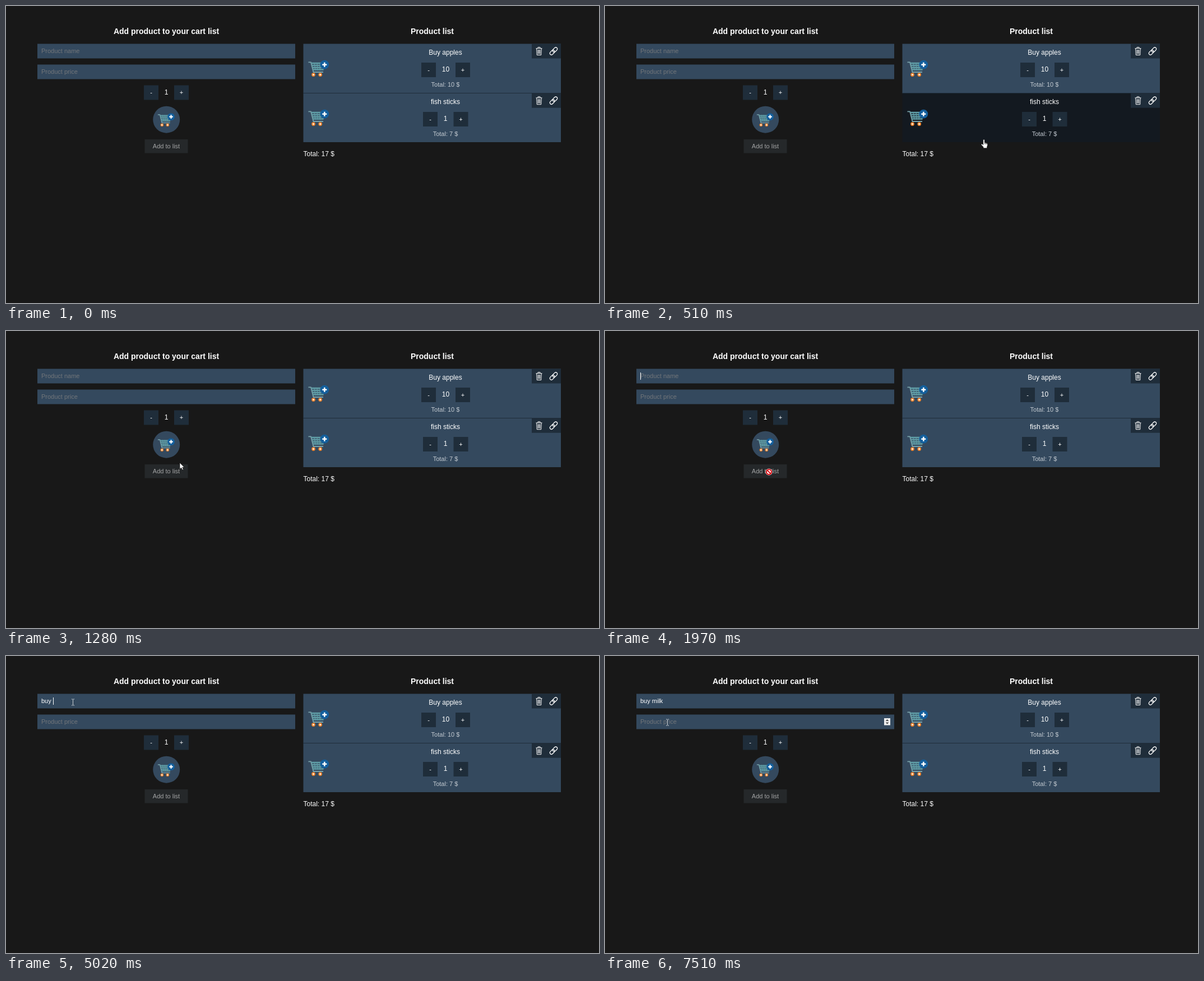
These frames come from a looping animation (1058x530 px, 8 s). An HTML page:

```html
<!DOCTYPE html>
<html lang="en">
<head>
<meta charset="utf-8">
<title>Cart list</title>
<style>
  html, body { margin: 0; width: 100%; height: 100%; overflow: hidden; background: #181818; }
  svg { display: block; }
  text { font: 11px "Liberation Sans", Arial, sans-serif; fill: #fff; white-space: pre; }
  .mid { text-anchor: middle; }
  .title { font-size: 14px; font-weight: bold; }
  .big { font-size: 12px; }
  .sum { fill: #c3cad1; }
  .hint { fill: #72767a; }
  .field { fill: #34495e; }
  .dark { fill: #1f2d3a; }
  .line { fill: none; stroke: #fff; }
</style>
</head>
<body>
<svg width="1058" height="530" viewBox="0 0 1058 530">
  <defs>
    <g id="minus"><rect class="dark" width="26" height="26"/><text class="mid" x="13" y="16.5">-</text></g>
    <g id="plus"><rect class="dark" width="26" height="26"/><text class="mid" x="13" y="16.5">+</text></g>

    <g id="cart">
      <g fill="none" stroke="#5f9da6" stroke-linejoin="round">
        <path d="M.5 4.3H5L9.5 22H27" stroke="#7aa3aa" stroke-width="1.8"/>
        <path d="M5.5 6.2H29M6.5 10H28.5M7.5 13.8H27.8M8.5 17.5H27" stroke-width="2.7"/>
        <path d="M11 5l2 14M16 5l1 14M21 5v14M28.8 5l-2 14" stroke-width="1.1"/>
      </g>
      <g fill="#fff" stroke="#f0842c" stroke-width="1.9">
        <circle cx="9.5" cy="26.6" r="2.4"/><circle cx="21.7" cy="26.6" r="2.4"/>
      </g>
      <circle cx="29.3" cy="8.7" r="7.9" fill="#145f9c"/>
      <path class="line" d="M25.3 8.7h8M29.3 4.7v8" stroke-width="2.5"/>
    </g>

    <g id="tools">
      <rect class="dark" width="52" height="26"/>
      <path class="line" d="M7.5 8.2H18.500M11 8V6.200H15V8M8.700 8.500L9.300 20H16.700L17.300 8.500M11.200 10.500V18M13 10.500V18M14.800 10.500V18"/>
      <g class="line" stroke-width="1.3" transform="translate(39 13) rotate(-45)">
        <rect x="-8.300" y="-2.800" width="9.600" height="5.600" rx="2.800"/>
        <rect x="-1.300" y="-2.800" width="9.600" height="5.600" rx="2.800"/>
      </g>
    </g>

    <path id="arrow" d="M0 0V11.500L2.700 9L4.600 13L6.500 12.200L4.700 8.300H8Z" fill="#fff" stroke="#111" stroke-width=".7"/>
    <g id="hand" stroke="#111" stroke-width=".7">
      <path d="M-1.300.800Q0-.800 1.300.800V5.500L5.500 6.800Q7 7.500 6.700 10L5.600 13.500V15.700H-1V13.700L-4.800 9.500Q-4.800 7.400-3 8.200L-1.300 9.700Z" fill="#fff"/>
      <path d="M1.400 6v2.500M3.300 6.500v2.300M5 7v2"/>
    </g>
    <path id="beam" class="line" d="M-2.500-5.500h2M.500-5.500h2M-2.500 5.500h2M.500 5.500h2M0-5V5" style="stroke:#c9ced2"/>
    <g id="deny">
      <circle r="6" fill="#fff"/>
      <path d="M-3-3L3 3" stroke="#d8141c" stroke-width="2"/>
      <circle r="4.500" fill="none" stroke="#d8141c" stroke-width="2.100"/>
    </g>
  </defs>

  <text class="mid title" x="286" y="50">Add product to your cart list</text>
  <rect class="field" x="56" y="67.500" width="460" height="26"/>
  <text id="name" x="63" y="84"></text>
  <rect class="field" x="56" y="104.500" width="460" height="26"/>
  <text class="hint" x="63" y="121">Product price</text>
  <g id="spinner">
    <rect x="498" y="111" width="11" height="12.500" fill="#efefef"/>
    <path d="M500.700 116L503.500 113L506.300 116ZM500.700 118.500L503.500 121.500L506.300 118.500Z" fill="#444"/>
  </g>
  <use href="#minus" x="246" y="141.500"/>
  <text class="mid big" x="286" y="158">1</text>
  <use href="#plus" x="300" y="141.500"/>
  <circle class="field" cx="286.200" cy="202.700" r="24"/>
  <use href="#cart" transform="translate(270.500 190.500) scale(.82)"/>
  <rect x="247.500" y="238" width="77" height="24.500" fill="#25282a"/>
  <text class="mid" x="286" y="254" style="fill:#a3a4a5">Add to list</text>

  <text class="mid title" x="760.500" y="50">Product list</text>
  <rect class="dark" x="530.500" y="154" width="459.500" height="3"/>
  <g>
    <rect class="field" x="530.500" y="67.500" width="459.500" height="87.500"/>
    <use href="#cart" x="539" y="96"/>
    <text class="mid big" x="784" y="87">Buy apples</text>
    <use href="#minus" x="741" y="101"/>
    <text class="mid big" x="784.500" y="117">10</text>
    <use href="#plus" x="802" y="101"/>
    <text class="mid sum" x="784" y="144">Total: 10 $</text>
    <use href="#tools" x="938" y="67.500"/>
  </g>
  <g>
    <rect id="row" x="530.500" y="156" width="459.500" height="87"/>
    <use href="#cart" x="539" y="184"/>
    <text class="mid big" x="784" y="175">fish sticks</text>
    <use href="#minus" x="744" y="189"/>
    <text class="mid big" x="784" y="205">1</text>
    <use href="#plus" x="798.500" y="189"/>
    <text class="mid sum" x="784" y="232">Total: 7 $</text>
    <use href="#tools" x="938" y="155.700"/>
  </g>
  <text class="big" x="530.500" y="268">Total: 17 $</text>

  <rect id="caret" width="1" height="13" fill="#fff"/>
  <use id="cursor"/>
</svg>
<script>
  const LOOP = 8000;
  const PHRASE = "buy milk";
  const keyTimes = [4720, 4870, 4950, 5020, 5480, 5650, 5880, 6030];

  // time, x, y; no x means hidden
  const caretSteps = [
    [0], [1970, 63, 74], [2430], [2980, 63, 74], [3450], [4000, 63, 74], [4550],
    [4720, 69, 74], [4870, 75, 74], [4950, 81, 74], [5020, 84, 74], [5480, 92, 74],
    [5650, 95, 74], [5880, 97, 74], [6030, 103, 74], [6580], [6960, 63, 111], [7510]
  ];

  // time, shape, hotspot x, y
  const cursorSteps = [
    [0],
    [280, "arrow", 858, 516], [360, "arrow", 800, 385], [430, "arrow", 737, 282],
    [510, "hand", 676, 238], [590, "arrow", 515, 216], [670, "arrow", 424, 217],
    [750, "arrow", 368, 222], [820, "arrow", 336, 227], [900, "arrow", 318, 231],
    [980, "arrow", 311, 232],
    [1280, "arrow", 310, 235], [1360, "deny", 306, 241], [1440, "deny", 301, 245],
    [1520, "deny", 297, 248], [1590, "deny", 294, 250], [1670, "deny", 292.5, 251.5],
    [2430, "deny", 294, 252], [3210, "deny", 294, 251],
    [3380, "deny", 285, 244], [3450, "arrow", 215, 171], [3530, "beam", 147.5, 105.5],
    [3610, "beam", 123.5, 86.5], [3680, "beam", 119.5, 82.5],
    [6730, "beam", 118.5, 90.5], [6810, "beam", 114.5, 106.5], [6880, "beam", 111.5, 118.5]
  ];

  const el = id => document.getElementById(id);
  const [nameText, spinner, row, caret, cursor] =
    ["name", "spinner", "row", "caret", "cursor"].map(el);

  const current = (steps, t) => steps.findLast(s => s[0] <= t);
  const show = (node, on) => node.setAttribute("visibility", on ? "visible" : "hidden");

  function place(node, x, y) {
    show(node, x !== undefined);
    if (x === undefined) return;
    node.setAttribute("x", x);
    node.setAttribute("y", y);
  }

  function draw(now) {
    const t = now % LOOP;
    const typed = PHRASE.slice(0, keyTimes.filter(k => k <= t).length);
    nameText.textContent = typed || "Product name";
    nameText.setAttribute("class", typed ? "" : "hint");

    const [, caretX, caretY] = current(caretSteps, t);
    place(caret, caretX, caretY);

    const [, shape, x, y] = current(cursorSteps, t);
    place(cursor, x, y);
    if (shape) cursor.setAttribute("href", "#" + shape);

    show(spinner, x > 56 && x < 516 && y > 104.5 && y < 130.5);
    const hover = x > 530 && x < 990 && y > 156 && y < 243;
    row.setAttribute("fill", hover ? "#131920" : "#34495e");
    requestAnimationFrame(draw);
  }

  draw(performance.now());
</script>
</body>
</html>
```
